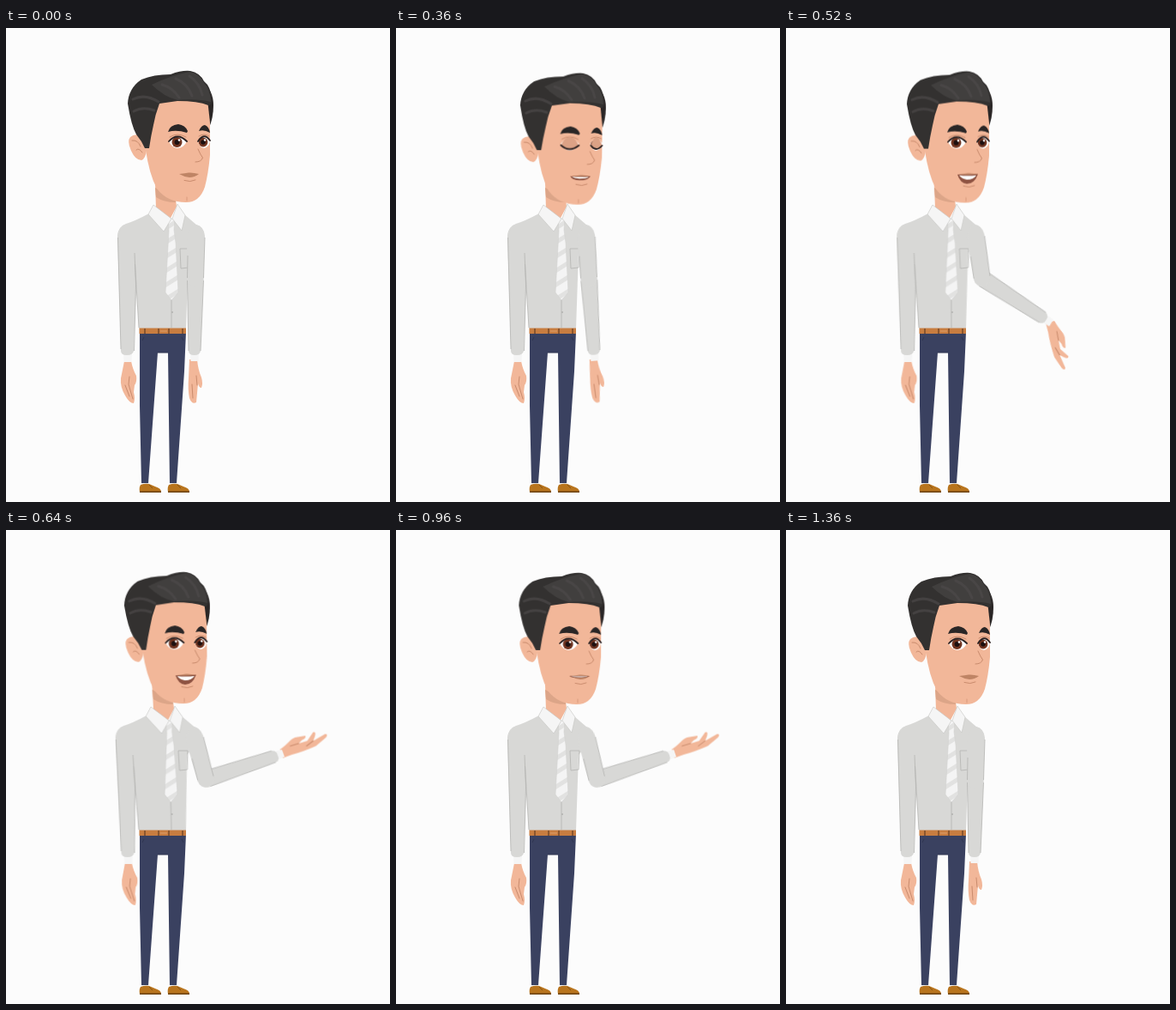
These frames come from a looping animation (448x552 px, 1.4 s). An HTML page without scripts:

```html
<!DOCTYPE html>
<html lang="en">
<head>
<meta charset="utf-8">
<title>Presenting man</title>
<style>
  html, body { margin: 0; width: 100%; height: 100%; overflow: hidden; background: #fcfcfc; }
  svg { display: block; width: 100vw; height: 100vh; }

  .skin { fill: #f2b799; }
  .crease { fill: none; stroke: #c98b6d; stroke-width: 1; stroke-linecap: round; }
  .shirt { fill: #d8d8d6; }
  .seam { fill: none; stroke: #b4b4b2; stroke-width: .8; }
  .white { fill: #f5f5f5; }
  .dark { fill: #2a2626; }
  .streak { fill: none; stroke: #4d4b4a; stroke-width: 3; stroke-linecap: round; }
  .lash { fill: none; stroke: #2a2020; stroke-width: 1.8; stroke-linecap: round; }
  .lid { fill: #dca286; }

  .anim { animation: 1400ms linear infinite; }
  .torso { animation-name: sway; transform-origin: 190px 351px; }
  .head { animation-name: nod; transform-origin: 190px 195px; }
  .arm { animation-name: shoulder; transform-origin: 221px 240px; }
  .forearm { animation-name: elbow; transform-origin: 221px 292px; }
  .hand { animation-name: wrist; transform-origin: 220px 386px; }
  .relaxed { animation-name: relaxed; animation-timing-function: step-end; }
  .open { animation-name: open; animation-timing-function: step-end; }
  .mouth { animation-name: talk; transform-origin: 213px 170px; }
  .lip { animation-name: lip; }
  .lash1 { animation-name: lash1; }
  .lash2 { animation-name: lash2; }
  .lid1 { animation-name: lid1; }
  .lid2 { animation-name: lid2; }

  @keyframes sway {
    0%, 25.7%, 68.57%, 100% { transform: skewX(0deg); }
    37.14% { transform: skewX(.4deg); }
    45.71%, 51.43% { transform: skewX(1.2deg); }
  }
  @keyframes nod {
    0%, 11.43%, 91.43%, 100% { transform: none; }
    17.14% { transform: translate(2px, 1.5px) rotate(.6deg); }
    25.71% { transform: translate(1.8px, 2.5px) rotate(.6deg); }
    37.14% { transform: translate(-1px, .6px) rotate(0deg); }
    45.71%, 51.43% { transform: translate(-3px, -.6px) rotate(-.6deg); }
    68.57%, 91.42% { transform: translate(1px, 0) rotate(.2deg); }
  }
  @keyframes shoulder {
    0%, 11.43%, 91.43%, 100% { transform: rotate(0deg); }
    17.14% { transform: rotate(-1.5deg); }
    25.71% { transform: rotate(-4.5deg); }
    37.14% { transform: rotate(-9deg); }
    45.71%, 91.42% { transform: rotate(-15deg); }
  }
  @keyframes elbow {
    0%, 25.71%, 91.43%, 100% { transform: rotate(0deg); }
    28.57% { transform: rotate(-4deg); }
    31.43% { transform: rotate(-14deg); }
    34.29% { transform: rotate(-29deg); }
    37.14% { transform: rotate(-48deg); }
    40% { transform: rotate(-70deg); }
    42.86% { transform: rotate(-88deg); }
    45.71%, 91.42% { transform: rotate(-94deg); }
  }
  @keyframes wrist {
    0%, 25.71%, 45.71%, 100% { transform: rotate(0deg); }
    31.43% { transform: rotate(12deg); }
    37.14% { transform: rotate(45deg); }
    42.86% { transform: rotate(16deg); }
  }
  @keyframes relaxed {
    0%, 91.43% { visibility: visible; }
    34.28% { visibility: hidden; }
  }
  @keyframes open {
    0%, 91.43% { visibility: hidden; }
    34.28% { visibility: visible; }
  }
  @keyframes talk {
    0%, 17.14%, 91.43%, 100% { transform: scaleY(0); }
    25.71% { transform: scaleY(.45); }
    37.14%, 51.43% { transform: scaleY(1); }
    68.57% { transform: scaleY(.2); }
    85.71% { transform: scaleY(0); }
  }
  @keyframes lip {
    0%, 17.14%, 85.71%, 100% { transform: none; }
    25.71% { transform: translateY(2px); }
    37.14%, 51.43% { transform: translateY(6px); }
    68.57% { transform: translateY(1px); }
  }
  /* Blink: the lash and the lid's lower edge share one curve per eye. */
  @keyframes lash1 {
    0%, 11.43%, 34.29%, 100% { d: path("M190 132Q200 121 211 132"); }
    17.14% { d: path("M190 132Q200 130 211 132"); }
    22.86%, 28.57% { d: path("M190 134Q200 143 211 134"); }
  }
  @keyframes lash2 {
    0%, 11.43%, 34.29%, 100% { d: path("M224 132Q231 121 238 131"); }
    17.14% { d: path("M224 132Q231 130 238 131"); }
    22.86%, 28.57% { d: path("M225 134Q231 142 238 134"); }
  }
  @keyframes lid1 {
    0%, 11.43%, 34.29%, 100% { d: path("M190 132Q200 121 211 132Q200 121 190 132"); }
    17.14% { d: path("M190 132Q200 119 211 132Q200 130 190 132"); }
    22.86%, 28.57% { d: path("M190 134Q200 114 211 134Q200 143 190 134"); }
  }
  @keyframes lid2 {
    0%, 11.43%, 34.29%, 100% { d: path("M224 132Q231 121 238 131Q231 121 224 132"); }
    17.14% { d: path("M224 132Q231 119 238 131Q231 130 224 132"); }
    22.86%, 28.57% { d: path("M225 134Q231 114 238 134Q231 142 225 134"); }
  }
</style>
</head>
<body>
<svg viewBox="0 0 448 552">
  <defs>
    <pattern id="stripes" width="14" height="14" patternUnits="userSpaceOnUse" patternTransform="rotate(-32)">
      <rect width="14" height="14" fill="#f4f4f4"/>
      <rect width="14" height="5" fill="#e2e2e1"/>
    </pattern>
    <g id="shoe">
      <path fill="#f3f3f3" d="M158 527H167V533H158Z"/>
      <path fill="#b8741d" d="M157 532Q162 530 167 531L174 534Q181 536 181 540H156Q155 535 157 532Z"/>
      <path fill="#6e430f" d="M156 539.4H181V541H156Z"/>
      <path fill="none" stroke="#855312" d="M167 532L171 536"/>
    </g>
    <clipPath id="eye1"><path d="M190 132Q200 121 211 132Q208 139 200 140Q193 139 190 132"/></clipPath>
    <clipPath id="eye2"><path d="M224 132Q231 121 238 131Q237 139 231 140Q226 139 224 132"/></clipPath>
  </defs>

  <g id="legs">
    <use href="#shoe"/>
    <use href="#shoe" x="33"/>
    <path fill="#3a4160" d="M156 354H210L208 400 199 530H191L189 378H177L166 530H158L156 440Z"/>
    <path fill="none" stroke="#2f3550" d="M177 378H189M161 360L159 364M205 360L207 364"/>
  </g>

  <g class="anim torso">
    <path class="skin" d="M174 180L175 210 191 223 199 208 197 190Z"/>
    <path fill="#dca588" d="M174 186L198 198V203Q184 203 175 197Z"/>

    <g id="left-arm">
      <path class="skin" d="M138 388H146Q148 398 152 405 153 412 150 416L149 424Q151 432 149 437 144 437 139 428 133 418 134 408 136 398 138 388Z"/>
      <path class="crease" d="M144 406L143 415 148 432M139 416L144 429"/>
      <path class="white" d="M137 379H147L146.500 389H137.500Z"/>
      <path class="shirt" d="M130 242Q131 231 141 228L151 260 152 300 149 376Q148 381 141 381 134 381 134 376Z"/>
    </g>

    <path class="shirt" d="M167 216Q150 225 140 228 131 231 130 242L150 262 155 350H210L213 262 231 240Q230 232 222 229L208 217 192 225Z"/>
    <path class="seam" d="M150 262L151.500 300 149.500 376M150.500 275L155 349M130.500 244L134 374M193 316V349M203 257H214L213 279 204 280Z"/>
    <circle cx="194" cy="331" r="1" fill="#b0b0ae"/>

    <path fill="url(#stripes)" stroke="#d2d2d0" stroke-width=".6" d="M189 222H197L196 235 198 250 201 308 193 317 186 308 190 236Z"/>
    <path class="white" stroke="#c4c4c2" stroke-width=".6" d="M172 206L166 217 184 237 193 222Z"/>
    <path class="white" stroke="#c4c4c2" stroke-width=".6" d="M200 205L209 218 205 236 194 222Z"/>

    <g class="anim arm">
      <g class="anim forearm">
        <g class="anim hand">
          <g class="anim relaxed">
            <path class="skin" d="M214 386H223Q224 398 228 407 230 414 228 419 225 419 224 414L222 436Q217 439 214 431 212 421 213 408Z"/>
            <path class="crease" d="M222 405L223 416M217 415L218 431"/>
          </g>
          <g class="anim open" transform="translate(220 386) rotate(109)">
            <path class="skin" d="M-2-5C6-10 10-17 16-19L28-21Q29-18 24-16L20-12 30-15 37-25Q41-26 39-20L37-15 51-23Q55-23 52-19L40-9Q24-2 12 1L1 5Z"/>
            <path class="crease" d="M10-9L20-12M29-9L37-15"/>
          </g>
        </g>
        <path class="white" d="M215 378H225L224.500 388H215.500Z"/>
        <path class="shirt" d="M211.500 292A9.500 9.500 0 0 1 230.500 292L227 376Q226 381 220 381 213 381 213 376Z"/>
        <path class="seam" d="M211.500 294L213 376M230.500 294L227 376"/>
      </g>
      <path class="shirt" d="M232 242L230.500 292A9.500 9.500 0 0 1 211.500 292L211 250Q212 232 222 229 231 231 232 242Z"/>
      <path class="seam" d="M212 265L211.500 291M232 244L230.500 291"/>
    </g>
  </g>

  <g id="belt">
    <path fill="#c87d40" d="M155.500 349.500H210V356H155.500Z"/>
    <path fill="none" stroke="#6b4226" stroke-width="1.300" d="M162 350V356M178 350V356M190 350V356M206 350V356"/>
    <path fill="none" stroke="#e0a06a" d="M180 353H188"/>
  </g>

  <g class="anim head">
    <path class="dark" d="M228 62Q242 72 242 90 242 104 237 116L230 90Z"/>
    <path class="skin" d="M162 128Q152 121 145 127 141 132 146 143 151 154 158 154 163 152 164 142Z"/>
    <path class="crease" d="M147 131Q154 130 157 138M152 142Q155 139 159 145"/>
    <path class="skin" d="M166 95L178 83H235L238 110 238 148Q236 170 232 185 226 203 210 203 188 203 176 187 167 170 163 142Z"/>
    <path fill="#333130" d="M142 88Q143 70 158 60 172 54 192 54 205 49 215 50 226 52 231 62 239 68 240 83 240 91 236 90 224 85 200 85L179 88Q174 101 172 113 169 126 167 140H162Q158 131 152 124 146 113 142 88Z"/>
    <path fill="#413f3e" d="M170 66Q190 56 214 51 226 53 231 64 238 71 239 86 222 82 200 84 184 80 170 66Z"/>
    <path class="streak" opacity=".65" d="M148 83Q162 76 178 86M149 97Q160 91 173 96M182 66Q194 69 202 81M198 59Q212 65 217 79M214 56Q226 64 229 78"/>

    <path class="dark" d="M189 121Q191 113 201 112 209 113 212 120L211 122Q199 118 189 121Z"/>
    <path class="dark" d="M225 120Q228 113 232 113 237 115 238 122 231 118 225 120Z"/>

    <g clip-path="url(#eye1)">
      <path fill="#fff" d="M188 120H213V142H188Z"/>
      <circle cx="199.500" cy="133" r="6" fill="#703420"/>
      <circle cx="199.500" cy="133" r="3" fill="#1d1010"/>
      <circle cx="202" cy="130.500" r="1.300" fill="#fff"/>
    </g>
    <g clip-path="url(#eye2)">
      <path fill="#fff" d="M222 120H240V142H222Z"/>
      <circle cx="230" cy="133" r="5.400" fill="#703420"/>
      <circle cx="230" cy="133" r="2.800" fill="#1d1010"/>
      <circle cx="232" cy="130.500" r="1.200" fill="#fff"/>
    </g>
    <path class="crease" d="M191 127Q200 121 210 127M225 126Q231 122 237 126"/>
    <path class="lid anim lid1" d="M190 132Q200 121 211 132Q200 121 190 132"/>
    <path class="lid anim lid2" d="M224 132Q231 121 238 131Q231 121 224 132"/>
    <path class="lash anim lash1" d="M190 132Q200 121 211 132"/>
    <path class="lash anim lash2" d="M224 132Q231 121 238 131"/>

    <path class="crease" stroke-width="1.300" d="M224 141Q227 148 229.500 151 228 156 221 156"/>
    <path fill="#bf8465" d="M202 170Q209 169 213 168.500 218 168 225 170 220 174 214 174 207 173 202 170Z"/>
    <g class="anim mouth">
      <path fill="#8e5342" d="M201 170Q213 171 225 169.500 221 181 212 181 204 180 201 170Z"/>
      <path fill="#fff" d="M203 171Q213 172 223 171 220 176 212 176 206 175 203 171Z"/>
    </g>
    <path class="crease anim lip" d="M208 177.500Q215 180 221 177"/>
    <path class="crease" opacity=".6" d="M211 197V201"/>
  </g>
</svg>
</body>
</html>
```
